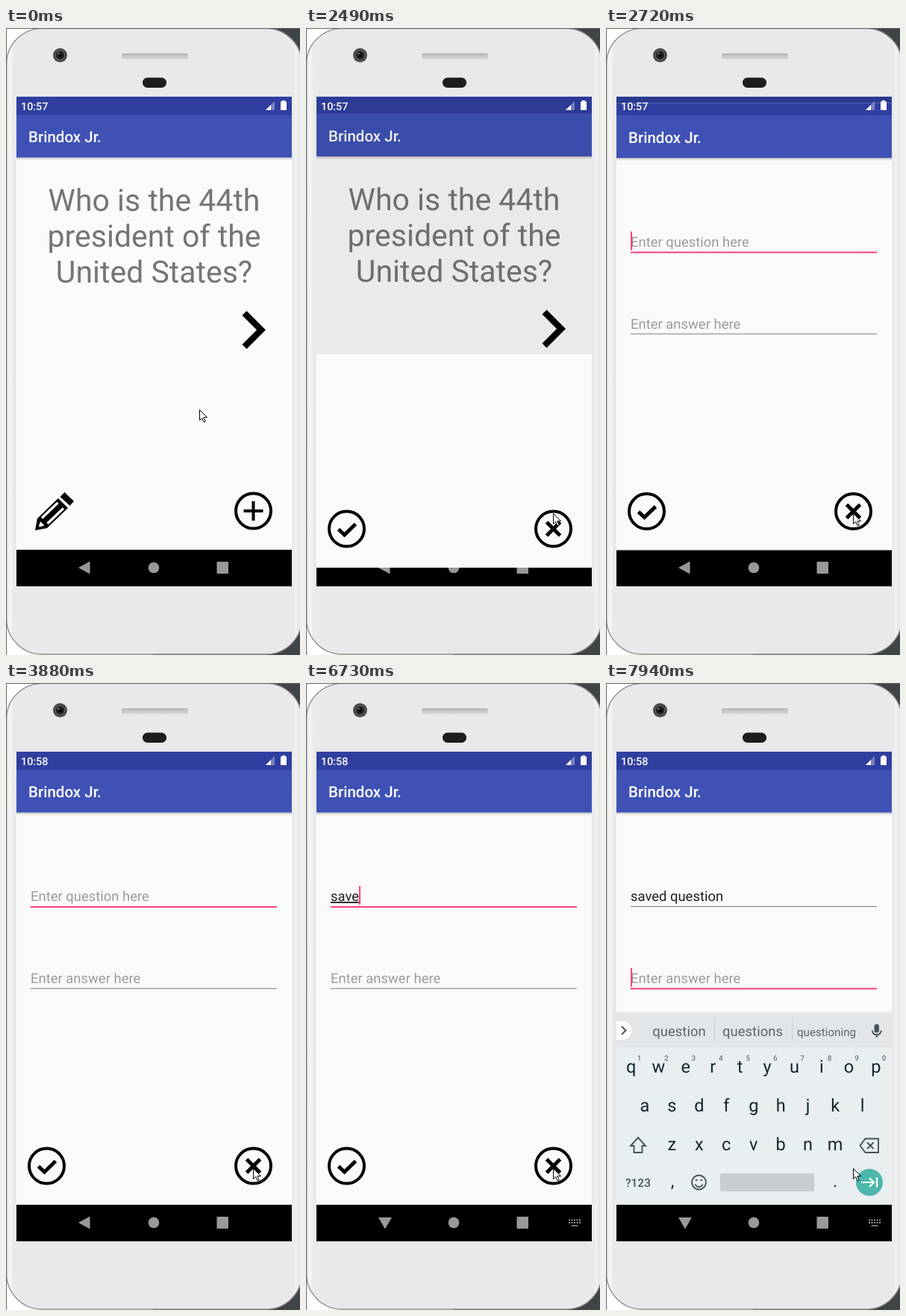
These frames come from a looping animation (394 by 840 pixels, 8000 ms). An HTML page:

```html
<!DOCTYPE html>
<html lang="en">
<head>
<meta charset="utf-8">
<title>Flash cards</title>
<style>
html, body { margin: 0; width: 100%; height: 100%; overflow: hidden; background: #fff; }
svg { display: block; font-family: Roboto, sans-serif; text-rendering: geometricPrecision; }
text { white-space: pre; }
.line { fill: none; stroke: #000; }
.field { font-size: 18.45px; fill: #212121; }
.hint { font-size: 18.45px; fill: #9b9b9b; }
.mid { text-anchor: middle; }
.key { font-size: 23.6px; fill: #14272e; text-anchor: middle; }
.digit { font-size: 10px; fill: #6f787c; font-weight: 500; text-anchor: middle; }
.icon { fill: none; stroke: #45545b; stroke-width: 1.9; }
#composing { text-decoration: underline; text-decoration-skip-ink: none; }
</style>
</head>
<body>
<svg width="394" height="840" viewBox="0 0 394 840">
  <defs>
    <linearGradient id="shell">
      <stop offset="0" stop-color="#dcdddd"/><stop offset=".008" stop-color="#f4f4f4"/>
      <stop offset=".018" stop-color="#f1f2f2"/><stop offset=".024" stop-color="#e8e9eb"/>
      <stop offset=".972" stop-color="#e8e9eb"/><stop offset=".98" stop-color="#f1f2f2"/>
      <stop offset="1" stop-color="#dedfdf"/>
    </linearGradient>
    <linearGradient id="slot" x2="0" y2="1">
      <stop offset="0" stop-color="#a9acb1"/><stop offset=".4" stop-color="#c5c8cc"/><stop offset="1" stop-color="#d3d5d8"/>
    </linearGradient>
    <linearGradient id="shade" x2="0" y2="1">
      <stop offset="0" stop-opacity=".22"/><stop offset="1" stop-opacity="0"/>
    </linearGradient>
    <clipPath id="window"><rect x="14" y="92" width="369" height="656"/></clipPath>
    <clipPath id="reveal"><rect id="revealBox" x="14" y="92" width="369" height="656"/></clipPath>
    <g id="page">
      <rect x="14" y="92" width="369" height="607" fill="#fafafa"/>
      <rect x="14" y="173.5" width="369" height="4" fill="url(#shade)"/>
      <rect x="14" y="92" width="369" height="25" fill="#303f9f"/>
      <rect x="14" y="116.5" width="369" height="57" fill="#3f51b5"/>
      <text x="30" y="153" font-size="20.5" font-weight="500" fill="#fff">Brindox Jr.</text>
    </g>
    <circle id="ring" cy="647" r="23.5" class="line" stroke-width="4"/>
  </defs>

  <!-- Phone -->
  <path d="M0 0H197V840H0z" fill="#fff"/>
  <path d="M197 0H394V840H197z" fill="#3f4447"/>
  <rect x=".5" y=".5" width="396" height="838.5" rx="48" fill="url(#shell)" stroke="#8f8c8c" stroke-width="1.4"/>
  <path d="M0 .5H394M.5 0V840" stroke="#666"/>
  <circle cx="72.500" cy="36.500" r="9.500" fill="#47484a"/>
  <circle cx="72.500" cy="36.500" r="6.300" fill="#222325" stroke="#6a6c6e"/>
  <circle cx="72.500" cy="36.500" r="2.500" fill="#050506"/>
  <circle cx="70.500" cy="34.500" r="1.200" fill="#7c8286"/>
  <rect x="155" y="34" width="89" height="7.500" rx="2" fill="url(#slot)"/>
  <rect x="183" y="66.500" width="32" height="13.500" rx="6.500" fill="#1d1d1f"/>

  <!-- Navigation bar -->
  <rect x="14" y="698" width="369" height="50"/>
  <g fill="#999">
    <path id="back" d="M97 723L112.500 714.500V731.500z"/>
    <circle cx="198" cy="723" r="7.300"/>
    <rect x="282.500" y="715" width="15.500" height="16" rx="1"/>
    <g id="typingNav">
      <path d="M97 716H115L106 731.500z"/>
      <path d="M352 719.500H368M352 723H368" stroke="#999" stroke-width="2" stroke-dasharray="2 1.500"/>
      <path d="M355.500 727H364.500" stroke="#999" stroke-width="1.500"/>
    </g>
  </g>

  <!-- Card screen -->
  <g clip-path="url(#window)" id="cardWindow">
    <g id="card">
      <use href="#page"/>
      <g class="mid" font-size="41" fill="#757575">
        <text x="198.500" y="245">Who is the 44th</text>
        <text x="198.500" y="293">president of the</text>
        <text x="198.500" y="341">United States?</text>
      </g>
      <path d="M322.500 379L348 404.500 322.500 430 316.500 424 336 404.500 316.500 385z"/>
      <path d="M78.500 622L91 634 85.500 640 72.500 628zM70 630L83 643 55 670 39 673 42 657z"/>
      <path d="M48 656.500L69.500 636M55.500 664L77 643.500" stroke="#fafafa" stroke-width="3.400"/>
      <path d="M46 661L51.500 666.500 45 668.500 44 667.500z" fill="#fafafa"/>
      <use href="#ring" x="331.500"/>
      <path d="M318.500 647H344.500M331.500 634V660" class="line" stroke-width="4"/>
    </g>
    <rect id="dim" x="14" y="92" width="369" height="607"/>
  </g>

  <!-- Form screen -->
  <g clip-path="url(#reveal)" id="formWindow">
    <g id="form">
      <use href="#page"/>
      <text id="hint" class="hint" x="33" y="292">Enter question here</text>
      <text id="typed" class="field" x="33" y="292"><tspan id="done"></tspan><tspan id="composing"></tspan></text>
      <text class="hint" x="33" y="402">Enter answer here</text>
      <rect id="questionLine" x="33" width="330"/>
      <rect id="answerLine" x="32.500" width="330.500"/>
      <rect id="caret" width="2" height="25" fill="#ff4081"/>
      <use href="#ring" x="54.500"/>
      <path d="M43.500 647.500L51.500 655 66.500 640.500" class="line" stroke-width="5"/>
      <use href="#ring" x="331.500"/>
      <path d="M322.500 638L340.500 656M340.500 638L322.500 656" class="line" stroke-width="5"/>
    </g>
  </g>

  <!-- Status bar -->
  <g fill="#fff">
    <text id="clock" x="20" y="109.500" font-size="14.350" font-weight="500"></text>
    <path d="M348 110H360V98z" opacity=".35"/>
    <path d="M348 110H355V103z"/>
    <path d="M368 98.500H370V97H374V98.500H376V110H368z"/>
  </g>

  <!-- Keyboard -->
  <g id="keyboard">
    <rect x="14" y="440.500" width="369" height="2" opacity=".06"/>
    <rect x="14" y="442" width="369" height="257" fill="#e9eef1"/>
    <rect x="14" y="442" width="369" height="46" fill="#e3e6e8"/>
    <path d="M14 453H22A12.500 12.500 0 0 1 22 478H14z" fill="#fff"/>
    <path d="M21 460L26.500 465.500 21 471" class="icon" stroke-width="2"/>
    <rect x="359.500" y="457" width="6.500" height="11.500" rx="3.200" fill="#45545b"/>
    <path d="M356.800 465.500A6 6 0 0 0 368.800 465.500M362.800 471.500V475" class="icon"/>
    <g id="suggestions" class="mid" font-size="18.500" fill="#5a666b">
      <text x="98" y="472.500">question</text>
      <text x="196.500" y="472.500">questions</text>
      <text x="295.500" y="472.500" font-size="15.200">questioning</text>
      <path d="M145.500 453V479M249.500 453V479" stroke="#c6cbce"/>
    </g>
    <g id="keys"></g>
    <path d="M43 609L53 620H48.500V629H37.500V620H33z" class="icon"/>
    <path d="M347.500 610.500H365V629H347.500L340.500 619.800zM350 615.500L358.500 624M358.500 615.500L350 624" class="icon"/>
    <text x="43" y="674.500" class="mid" font-size="15.500" font-weight="500" fill="#45545b">?123</text>
    <circle cx="124.500" cy="669" r="9.500" class="icon"/>
    <path d="M119.500 671.500A5.300 5.300 0 0 0 129.500 671.500" class="icon"/>
    <path d="M119.800 666H122.600M126.400 666H129.200" class="icon" stroke-width="2.600"/>
    <rect x="153" y="657" width="126" height="24" rx="2" fill="#c8cdd0"/>
    <circle cx="353" cy="669" r="18" fill="#4db6ac"/>
    <path d="M342 669H358.500M353 663L359 669 353 675M363 662.500V675.500" class="line" style="stroke:#fff" stroke-width="2.200"/>
  </g>

  <path id="pointer" d="M.5 .5V14.500L3.700 11.500 6.200 17 8.300 16 5.800 10.700H10.500z" fill="#fff" stroke="#000"/>
</svg>
<script>
const $ = id => document.getElementById(id);
const set = (id, attrs) => { for (const k in attrs) $(id).setAttribute(k, attrs[k]); };
const show = (id, on) => set(id, { display: on ? 'inline' : 'none' });
const move = (id, x, y) => set(id, { transform: `translate(${x} ${y})` });

const LOOP = 8000, OPEN = 2490, OPENED = 2800, KEYBOARD = 7230, NEXT_FIELD = 7940;
const typing = [
  [0, ''], [5460, 's'], [5550, 'sa'], [6640, 'sav'], [6730, 'save'], [7230, 'saved'],
  [7380, 'saved q'], [7460, 'saved que'], [7540, 'saved ques'], [7620, 'saved questi'], [7700, 'saved question']
];
const caretOn = [[OPEN, OPENED], [3330, 3880], [4330, 4880], [5280, LOOP]];

const key = (label, x, y, cls = 'key') => `<text x="${x}" y="${y}" class="${cls}">${label}</text>`;
const row = (letters, x, y) => [...letters].map((c, i) => key(c, x + i * 36.45, y)).join('');
$('keys').innerHTML = row('qwertyuiop', 33.8, 522) + row('asdfghjkl', 52, 574) + row('zxcvbnm', 88.300, 626)
  + [...'1234567890'].map((c, i) => key(c, 44.5 + i * 36.45, 506, 'digit')).join('')
  + key(',', 89, 675) + key('.', 307, 675);

function drawPointer(t) {
  const p = Math.max(0, Math.min(1, (Math.floor((t - 750) / 90) + 1) / 8));
  const e = p * p * (3 - 2 * p);
  move('pointer', 259 + 72 * e, 511 + 139 * e);
}

function drawTransition(t) {
  const elapsed = Math.floor((t - 2488) / 77) * 77;
  const left = t < OPENED ? Math.exp(-elapsed / 62) : 0;
  const opening = t >= OPEN;
  const offset = 24 * left;
  show('cardWindow', t < OPENED);
  show('formWindow', opening);
  move('card', 0, opening ? -13 * (1 - offset / 26.9) : 0);
  set('dim', { opacity: opening ? 0.1 - 0.036 * left : 0 });
  move('form', 0, offset);
  const top = 92 + 345 * left;
  set('revealBox', { y: top, height: 748 - top });
}

function drawForm(t) {
  const text = typing.findLast(([at]) => t >= at)[1];
  const answering = t >= NEXT_FIELD;
  const split = answering ? text.length : text.lastIndexOf(' ') + 1;
  $('done').textContent = text.slice(0, split);
  $('composing').textContent = text.slice(split);
  show('hint', !text);
  const underline = (id, y, focused) =>
    set(id, { y, height: focused ? 2 : 1, fill: focused ? '#ff4081' : '#7c7c7c' });
  underline('questionLine', 299, !answering);
  underline('answerLine', answering ? 408.5 : 408.8, answering);
  const textWidth = text && !answering ? $('typed').getComputedTextLength() : 0;
  set('caret', { x: 33 + textWidth, y: answering ? 382 : 272 });
  show('caret', caretOn.some(([from, to]) => t >= from && t < to));
  show('back', !text);
  show('typingNav', text);
}

function drawKeyboard(t) {
  show('keyboard', t >= KEYBOARD);
  move('keyboard', 0, t < 7300 ? 10 : 0);
  set('keyboard', { opacity: t < 7300 ? 0.6 : t < 7380 ? 0.96 : 1 });
  show('suggestions', t >= 7620);
}

function draw(now) {
  const t = now % LOOP;
  $('clock').textContent = t < 3420 ? '10:57' : '10:58';
  drawPointer(t);
  drawTransition(t);
  drawForm(t);
  drawKeyboard(t);
  requestAnimationFrame(draw);
}
requestAnimationFrame(draw);
</script>
</body>
</html>
```
